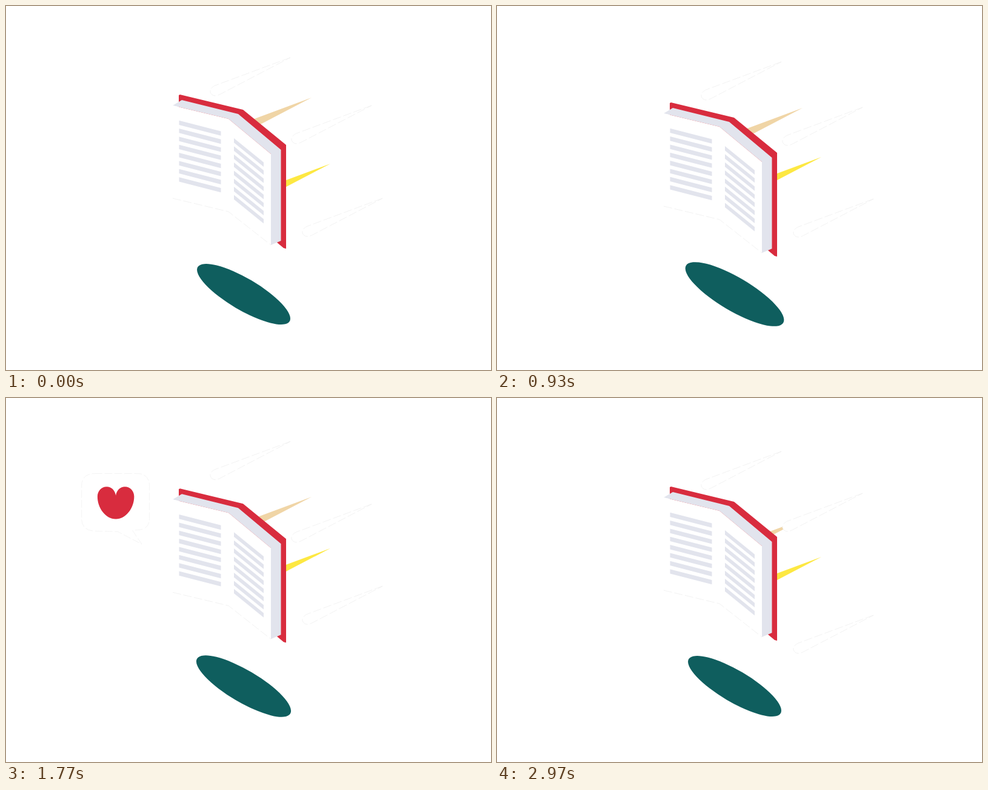
Recreate the animation shown at these times as an HTML page. Size 800 px wide and 600 px high, loop 3 s.

```html
<!DOCTYPE html>
<html lang="en">
<head>
<meta charset="utf-8">
<title>Flying book</title>
<style>
  html, body { margin: 0; width: 100%; height: 100%; overflow: hidden; background: #fff; }
  svg { display: block; width: 800px; height: 600px; }
  .faint { fill: #fff; stroke: #ededed; stroke-width: .7; stroke-dasharray: 14 4; }
</style>
</head>
<body>
<svg viewBox="0 0 800 600">
  <defs>
    <path id="streak" d="M0 0L-124 46C-129 48 -133 53 -132 57Q-130 63 -123 63Q-118 62 -113 59Z"/>
  </defs>
  <ellipse id="shadow" rx="88" ry="26" fill="#0f5e5e"/>
  <use id="tan" href="#streak" fill="#f0d5a6"/>
  <use id="yellow" href="#streak" fill="#fde842"/>
  <use id="top" href="#streak" class="faint"/>
  <use id="mid" href="#streak" class="faint"/>
  <use id="low" href="#streak" class="faint"/>
  <g id="book">
    <path fill="#d82c3e" d="M285 147L287 146L391 171L462 229V400L458 399L446 389L380 330L285 300Z"/>
    <path fill="#e2e4ed" d="M275 164L290 155L383 178L453.500 237V387L437 394V244L367 186Z"/>
    <path fill="#fff" d="M275 164L367 186L437 244V394L367 339L275 317Z"/>
    <path class="faint" style="fill:none" d="M275 317L367 339L437 394"/>
    <path id="lines" fill="#e2e4ed"/>
  </g>
  <g id="bubble">
    <path class="faint" d="M138 112H215Q238 112 238 135V194Q238 215 215 215L207 216L224 241L180 218L138 217Q114 216 114 194V135Q114 112 138 112Z"/>
    <path fill="#d82c3e" d="M176.500 152C175 142 168 136 160 136C150 136 143 144 143 154C143 175 158 195 176.500 195C195 195 210 175 210 154C210 144 203 136 193 136C185 136 178 142 176.500 152Z"/>
  </g>
</svg>
<script>
const FRAME = 30, LOOP = 3000;
const el = id => document.getElementById(id);
const place = (id, transform) => el(id).setAttribute('transform', transform);
const clamp = x => Math.max(0, Math.min(1, x));

// Tracks: [step, y] points joined by a smooth curve
const book = [[0, 146], [16, 185], [18.5, 186.5], [31, 159], [38.5, 192], [46, 157],
              [55, 155], [71, 136], [85, 186], [91, 177], [99, 146]];
const streaks = {
  tan:    [504, [[0, 151], [16, 170], [31, 168], [46, 160], [71, 166], [85, 160], [99, 200]]],
  yellow: [535, [[0, 260], [16, 274], [31, 249], [46, 225], [71, 269], [85, 249], [99, 262]]],
  top:    [469, [[0, 85], [9, 59], [16, 76], [31, 92], [46, 96], [54, 88], [64, 58], [71, 70], [85, 102], [99, 88]]],
  mid:    [603, [[0, 164], [16, 187], [31, 167], [46, 163], [71, 185], [85, 176], [99, 157]]],
  low:    [621, [[0, 317], [16, 307], [31, 318], [46, 317], [71, 307], [85, 326], [99, 358]]]
};
const popups = [[300, 780], [1720, 2080]];

function slope(points, i) {
  const a = points[i - 1], b = points[i + 1];
  return a && b ? (b[1] - a[1]) / (b[0] - a[0]) : 0;
}

function sample(points, x) {
  let i = 0;
  while (i < points.length - 2 && x >= points[i + 1][0]) i++;
  const [x0, y0] = points[i], [x1, y1] = points[i + 1];
  const w = x1 - x0, u = (x - x0) / w, v = 1 - u;
  return y0 * (1 + 2 * u) * v * v + y1 * (3 - 2 * u) * u * u
    + w * u * v * (v * slope(points, i) - u * slope(points, i + 1));
}

const bar = (x0, y0, x1, y1) => `M${x0} ${y0}L${x1} ${y1}v7.300L${x0} ${y0 + 7.3}Z`;
let bars = '';
for (let i = 0; i < 8; i++) {
  const y = i * 13.35;
  bars += bar(285.5, 188.7 + y, 354.5, 206.5 + y) + bar(376, 218 + y, 425, 257.7 + y);
}
el('lines').setAttribute('d', bars);

function draw(now) {
  const step = Math.floor(now % LOOP / FRAME), t = step * FRAME;
  const y = sample(book, step);
  place('book', `translate(0 ${y - 146})`);
  place('shadow', `translate(392 475) rotate(30.5) scale(${1 + (y - 146) * .0044})`);
  for (const id in streaks) {
    const [x, points] = streaks[id];
    place(id, `translate(${x} ${sample(points, step)})`);
  }
  let size = 0;
  for (const [from, to] of popups) size = Math.max(size, clamp(Math.min(t - from, to - t) / 120));
  size *= size * (3 - 2 * size) / (size || 1);
  el('bubble').style.display = size ? '' : 'none';
  place('bubble', `translate(224 241) scale(${size}) translate(-224 -241)`);
}

let start;
function tick(now) {
  start ??= now;
  draw(now - start);
  requestAnimationFrame(tick);
}
draw(0);
requestAnimationFrame(tick);
</script>
</body>
</html>
```
